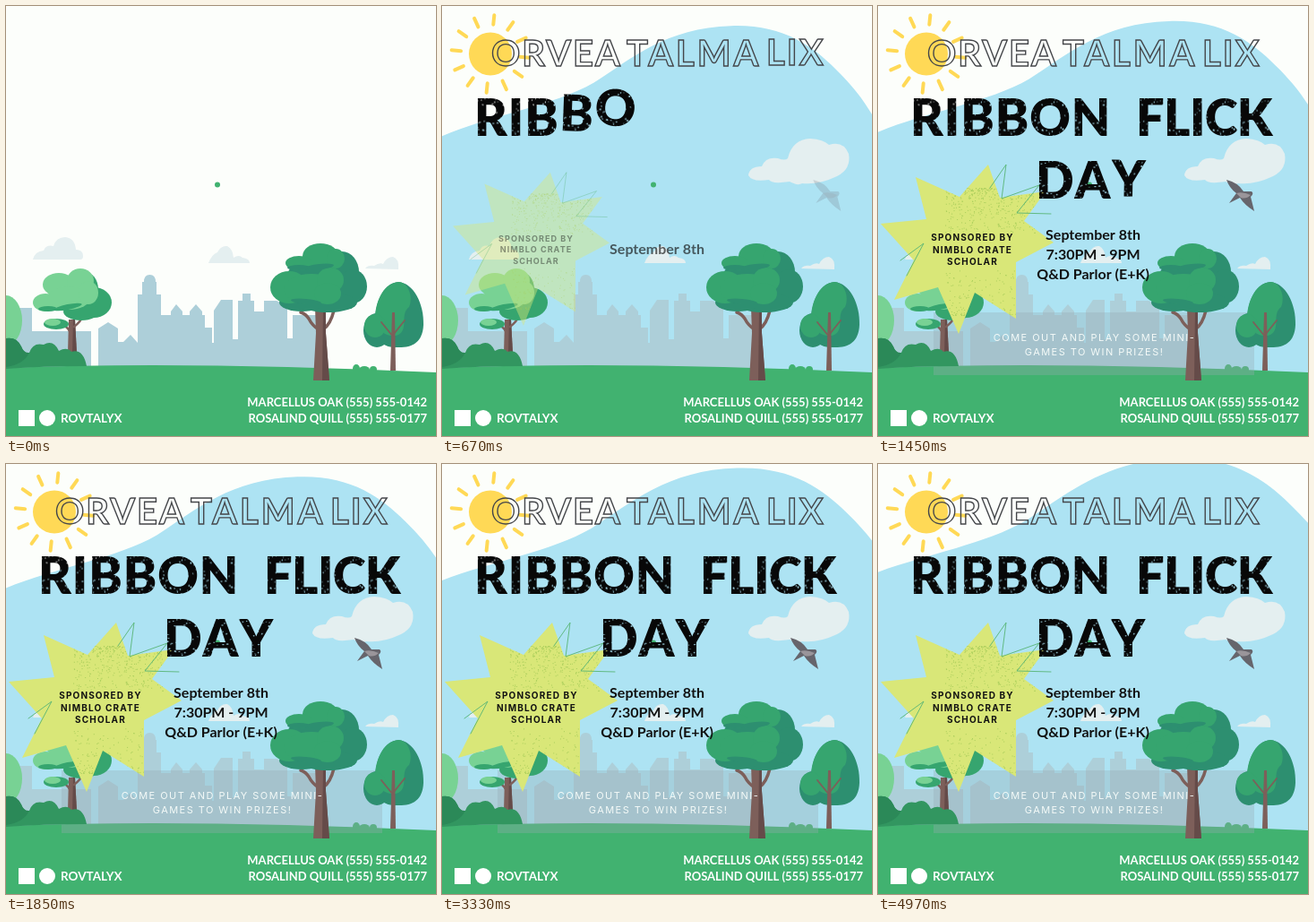
An HTML page with a canvas that plays this animation: 480 px wide and 480 px high, repeating every 5000 ms.

```html
<!DOCTYPE html>
<html lang="en">
<head>
<meta charset="utf-8">
<title>Ribbon Flick Day</title>
<style>
html, body { margin: 0; width: 100%; height: 100%; overflow: hidden; background: #fcfefb; }
canvas { display: block; width: 480px; height: 480px; }
</style>
</head>
<body>
<canvas id="stage" width="480" height="480"></canvas>
<script>
const stage = document.getElementById('stage');
const LOOP = 5000;
const MID = '#36a56f', DARK = '#2d8f70', LIGHT = '#78d294', GRASS = '#41b270';
const BARK = '#7d5f5a', BARK_DARK = '#654b49', CLOUD = '#e4eff0';
const LATO = 'Lato, sans-serif', INTER = 'Inter, sans-serif';
const c = stage.getContext('2d');

const progress = (t, start, dur) => Math.min(1, Math.max(0, (t - start) / dur));
const easeOut = p => 1 - (1 - p) ** 3;

function randomFrom(seed) {
  return () => (seed = seed * 16807 % 2147483647) / 2147483647;
}

function fill(d, color) {
  c.fillStyle = color;
  c.fill(new Path2D(d));
}

function line(d, color, width) {
  c.strokeStyle = color;
  c.lineWidth = width;
  c.lineCap = c.lineJoin = 'round';
  c.stroke(new Path2D(d));
}

function ellipses(color, ...list) {
  c.fillStyle = color;
  for (const [x, y, rx, ry, turn = 0] of list) {
    c.beginPath();
    c.ellipse(x, y, rx, ry, turn, 0, 7);
    c.fill();
  }
}

function text(s, x, y, font, color, align = 'center', spacing = 0) {
  c.font = font;
  c.fillStyle = color;
  c.textAlign = align;
  c.letterSpacing = spacing + 'px';
  c.fillText(s, x, y);
  c.letterSpacing = '0px';
}

// Draws a part shifted by (x, y) with the given opacity.
function part(alpha, x, y, draw) {
  if (alpha <= 0) return;
  c.save();
  c.globalAlpha = alpha;
  c.translate(x, y);
  draw();
  c.restore();
}

function wornInk() {
  const tile = document.createElement('canvas');
  tile.width = tile.height = 128;
  const g = tile.getContext('2d');
  const rnd = randomFrom(11);
  g.fillStyle = '#080808';
  g.fillRect(0, 0, 128, 128);
  g.globalCompositeOperation = 'destination-out';
  for (let i = 0; i < 650; i++) {
    g.beginPath();
    g.ellipse(rnd() * 128, rnd() * 128, .3 + rnd() * .8, .3 + rnd() * .7, rnd() * 3, 0, 7);
    g.fill();
  }
  return c.createPattern(tile, 'repeat');
}

function leftTree() {
  fill('M69 388L70 350H77L79 388Z', BARK);
  fill('M74 388L75 350H77L79 388Z', BARK_DARK);
  line('M71 363Q67 355 58 356M76 358Q83 353 88 343', BARK, 2.5);
  ellipses(MID, [98, 331, 20, 17], [84, 341, 20, 10], [56, 355, 14, 6], [88, 316, 15, 19]);
  ellipses(LIGHT, [59, 311, 18, 13], [83, 307, 15, 14], [44, 331, 14, 10], [70, 326, 24, 13], [92, 320, 11, 13]);
  ellipses(MID, [69, 336, 16, 3, -.2], [47, 338, 11, 3]);
  ellipses(LIGHT, [52, 353, 9, 4]);
}

function middleTree() {
  line('M349 361Q342 357 338 349Q335 344 329 342M354 361Q362 356 366 340', BARK, 3.5);
  fill('M343 418L346 365L345 336H357L357 365L361 418Z', BARK);
  fill('M353 418L354 336H357L357 365L361 418Z', BARK_DARK);
  ellipses(DARK, [375, 297, 19, 23], [387, 313, 16, 19], [359, 331, 33, 11], [330, 331, 25, 10], [341, 307, 29, 24]);
  ellipses(MID, [351, 279, 20, 14], [368, 282, 10, 11], [327, 287, 15, 8], [316, 314, 21, 18],
    [341, 316, 31, 17], [362, 306, 15, 14], [359, 321, 15, 12]);
  ellipses(DARK, [327, 292, 13, 3], [350, 291, 16, 3, -.1], [335, 330, 17, 3, .1]);
}

function rightTree() {
  ellipses(DARK, [414, 362, 15, 19]);
  fill('M438 308C455 309 467 333 466 356C465 377 452 382 435 381C418 381 412 371 412 350C413 327 423 309 438 308Z', DARK);
  fill('M438 308C449 308 455 325 450 336C439 344 450 361 438 367C426 372 412 361 412 347C413 327 423 309 438 308Z', MID);
  ellipses(MID, [412, 357, 12, 13]);
  fill('M429 407L431 342H434L435 407Z', BARK);
  line('M432 369L419 353M433 366L445 351', BARK, 1.8);
}

function backdrop() {
  fill('M30 283Q32 274 42 273Q45 266 53 268Q56 258 66 258Q77 259 78 272Q86 272 86 279Q86 283 83 283Z', CLOUD);
  fill('M226 287Q230 277 236 275Q240 267 247 268Q253 271 254 281Q260 277 264 281Q272 282 272 287Z', CLOUD);
  fill('M401 293Q404 289 411 290Q417 286 421 288Q425 280 432 280Q439 282 438 294Z', CLOUD);
  fill('M0 337H29V363H95V402H103V360L114 353L125 360V375H131L139 367L147 376V322H152V308H154Q154 300 160.500 300'
    + 'Q167 300 167 308H168V322H173V345H184V341L190 333L197 341V345H205V341L212 333L219 341V345H222V359H230V376'
    + 'H232V340L240 328H253V372H259V329H264V321H273V329H277V341H288V329H302L314 335V371H320V345H346V410H0Z', '#adcfd9');
  ellipses(GRASS, [391, 405, 4, 5], [400, 406, 6, 4], [410, 406, 4, 4]);
  fill('M0 404Q200 396 480 409V480H0Z', GRASS);
}

function woods() {
  ellipses(LIGHT, [0, 351, 18, 28]);
  leftTree();
  fill('M0 371Q12 369 17 380Q20 388 26 387Q30 375 42 378Q53 372 59 385Q68 380 73 386Q86 382 90 402Q40 402 0 405Z', '#329660');
  fill('M0 371Q12 369 17 380Q20 388 26 387Q20 400 0 403Z', '#2b8958');
  middleTree();
  rightTree();
  ellipses(GRASS, [236, 199.500, 3, 3]);
}

function footer() {
  c.fillStyle = '#fff';
  c.fillRect(14, 451, 18, 18);
  ellipses('#fff', [46, 460, 9, 9]);
  text('ROVTALYX', 61, 464.500, '700 13.5px ' + LATO, '#fff', 'left');
  const font = '700 13px ' + LATO;
  text('MARCELLUS OAK (555) 555-0142', 470, 447, font, '#fff', 'right');
  text('ROSALIND QUILL (555) 555-0177', 470, 465, font, '#fff', 'right');
}

function sky(t) {
  const s = 1 + .024 * (t - 390) / 1000;
  part(progress(t, 30, 300), 220, 300 + 40 * (1 - easeOut(progress(t, 30, 330))), () => {
    c.scale(s, s);
    c.translate(-220, -300);
    fill('M-90 190C-40 176 -20 153 0 147C55 123 125 113 170 87C212 60 250 26 322 24C378 22 411 45 438 72'
      + 'C464 97 481 123 492 150L570 260V520H-90Z', '#ade3f3');
  });
}

function sun() {
  ellipses('#ffd956', [0, 0, 24, 24]);
  for (let i = 0; i < 12; i++) {
    const a = i * Math.PI / 6 + .1, x = Math.cos(a), y = Math.sin(a);
    line(`M${x * 33} ${y * 33}L${x * 43.500} ${y * 43.500}`, '#ffd956', 4);
  }
}

function bird() {
  fill('M389 194Q402 197 408 207L417 207Q420 209 416 213L420 229Q409 222 404 214L392 220Q397 213 400 209Q392 203 389 194Z', '#66656c');
  fill('M400 209Q407 207 416 211Q411 216 405 214Z', '#9a959a');
}

const STAR = 'M42 191L91 213L123 177L136 214L187 207L163 240L196 264L154 286L154 349'
  + 'L108 320L90 366L67 314L18 328L40 284L3 243L54 238Z';

// Green grain, thickest along the upper and lower right of the star.
function grain() {
  const rnd = randomFrom(5);
  c.save();
  c.clip(new Path2D(STAR));
  c.fillStyle = '#a9cd5b';
  for (let i = 0; i < 700; i++) {
    const depth = 50 * rnd() ** 2;
    c.fillRect(75 + rnd() * 100, i % 3 ? 203 + depth : 345 - depth, 1, 1);
  }
  c.restore();
}

function badge() {
  fill(STAR, '#d9e778');
  grain();
  line('M125 203L143 177L138 215L180 200L155 231L193 232M25 284L51 265L32 301', '#58b575', .9);
  const font = '700 10px ' + INTER;
  ['SPONSORED BY', 'NIMBLO CRATE', 'SCHOLAR'].forEach((s, i) =>
    text(s, 105.500, 262 + i * 13.7, font, '#111', 'center', 1.15));
}

function title(t) {
  [['ORVEA', 55, 2], ['TALMA', 206, 3], ['LIX', 362, 2]].forEach(([word, x, spacing], i) => {
    const p = progress(t, 250 + 70 * i, 300);
    part(Math.min(1, p * 5), x, 67 - 17 * (1 - p), () => {
      c.font = '700 40px ' + LATO;
      c.textAlign = 'left';
      c.letterSpacing = spacing + 'px';
      c.strokeStyle = '#44464a';
      c.lineWidth = 1.4;
      c.lineJoin = 'miter';
      c.strokeText(word, 0, 0);
      c.letterSpacing = '0px';
    });
  });
}

const ink = wornInk();

function headline(t) {
  let n = 0;
  for (const [word, left, y, spacing] of [['RIBBON', 36, 144.500, 1], ['FLICK', 288, 144.500, -.6], ['DAY', 176, 215, 1]]) {
    let x = left;
    for (const ch of word) {
      c.font = '900 56px ' + LATO;
      const w = c.measureText(ch).width;
      const p = progress(t, 345 + 75 * n++, 160);
      part(Math.min(1, p * 8), x + w / 2, y - 13 * (1 - p), () => {
        c.rotate(.1 * (1 - p));
        text(ch, 0, 0, c.font, ink);
      });
      x += w + spacing;
    }
  }
}

function details(t) {
  const font = '700 16px ' + LATO;
  const rows = [['September 8th', 260.500, 550], ['7:30PM - 9PM', 282.500, 850], ['Q&D Parlor (E+K)', 304.500, 850]];
  for (const [s, y, start] of rows) {
    const p = easeOut(progress(t, start, 400));
    part(p, 0, 50 * (1 - p), () => text(s, 240, y, font, '#111'));
  }
}

function panel() {
  c.fillStyle = 'rgba(150,168,176,.33)';
  c.fillRect(62, 342, 358, 70);
}

function invitation() {
  const font = '400 11px ' + INTER;
  text('COME OUT AND PLAY SOME MINI-', 241.500, 374, font, '#f4faf8', 'center', 1.45);
  text('GAMES TO WIN PRIZES!', 241.500, 390, font, '#f4faf8', 'center', 1.45);
}

function draw(t) {
  c.fillStyle = '#fcfefb';
  c.fillRect(0, 0, 480, 480);
  sky(t);
  backdrop();

  const shown = progress(t, 900, 400), drop = 38 * (1 - easeOut(shown));
  part(shown, 0, drop, panel);
  woods();
  part(shown, 0, drop, invitation);
  footer();

  let p = progress(t, 100, 500);
  part(Math.min(1, p * 1.4), 54 - 60 * (1 - easeOut(p)), 53.500, sun);

  p = progress(t, 250, 400);
  part(p, 110 * (1 - easeOut(p)), 0, () =>
    fill('M342 189Q343 179 357 179Q361 168 375 170Q383 173 386 170Q391 149 411 148Q426 149 432 155'
      + 'Q448 150 454 165Q457 182 441 190Q420 200 402 198Q397 201 388 196Q368 199 365 194Q346 197 342 189Z', CLOUD));

  p = progress(t, 600, 350);
  part(p, 50 * (1 - easeOut(p)), 0, bird);

  p = progress(t, 500, 400);
  part(p, 100, 270, () => {
    const s = .5 + .5 * easeOut(p);
    c.scale(s, s);
    c.translate(-100, -270);
    badge();
  });

  title(t);
  headline(t);
  details(t);
}

const begin = performance.now();
function tick(now) {
  draw(Math.max(0, now - begin) % LOOP);
  requestAnimationFrame(tick);
}
requestAnimationFrame(tick);
</script>
</body>
</html>
```
